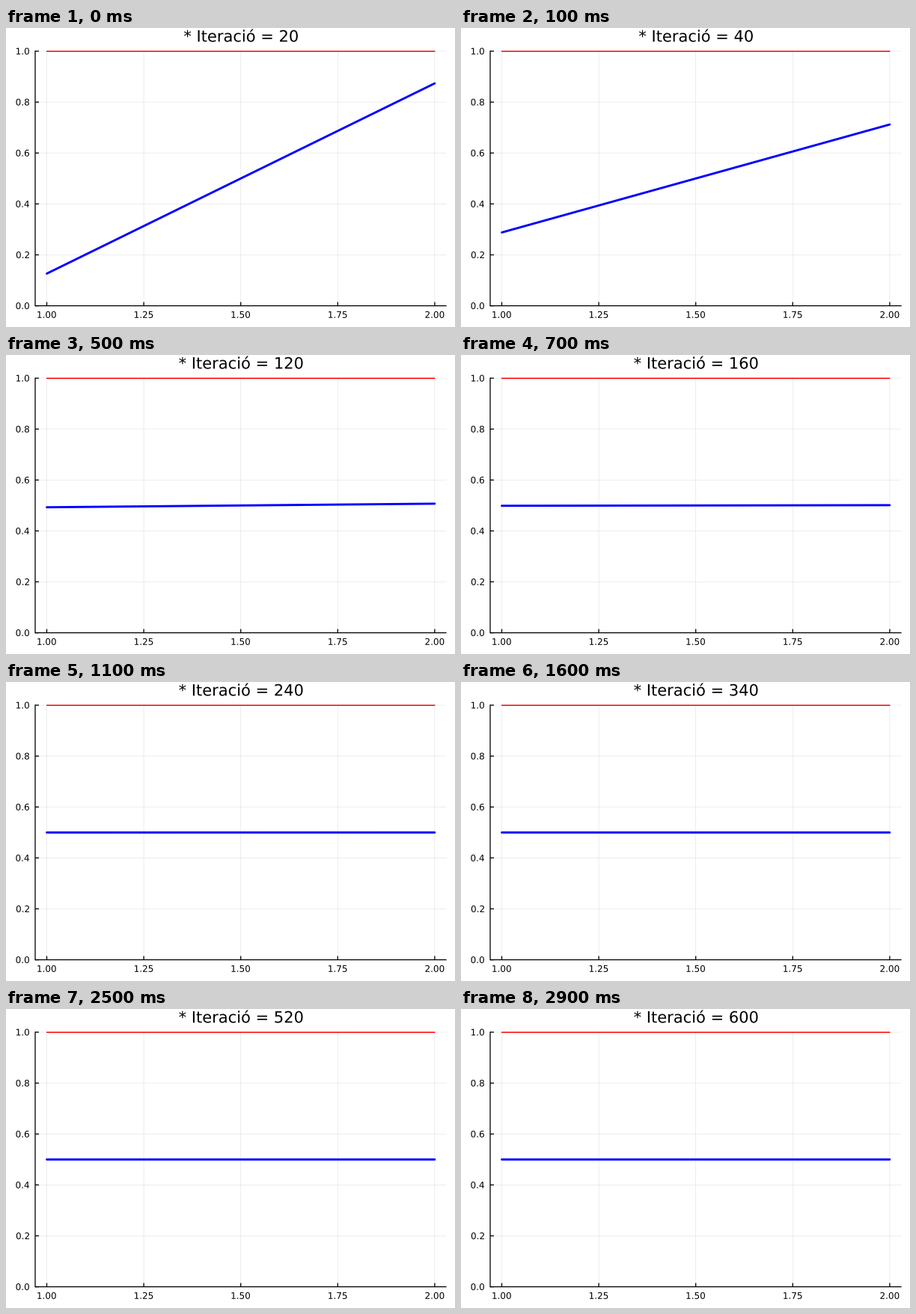
A matplotlib script for the animation above (3 s loop, 600 by 400 pixels).

```python
import numpy as np
import matplotlib.pyplot as plt
from matplotlib.animation import FuncAnimation
from matplotlib.patches import PathPatch
from matplotlib.textpath import TextPath
from matplotlib.transforms import Affine2D

W, H, DPI = 600, 400, 100
FRAMES, STEP = 30, 20
LEFT, RIGHT, TOP, BOTTOM = 39.0, 588.6, 31.0, 371.6
X1, X2 = 54.5, 572.9
TICK = 5
TITLE_SIZE, LABEL_SIZE = 21, 12

plt.rcParams["font.family"] = "DejaVu Sans"

fig = plt.figure(figsize=(W / DPI, H / DPI), dpi=DPI, facecolor="white")
ax = fig.add_axes([0, 0, 1, 1])
ax.set_xlim(0, W)
ax.set_ylim(H, 0)
ax.axis("off")


def px(width):
    """Convert a width in pixels to points."""
    return width * 72 / DPI


def x_pos(value):
    return X1 + (value - 1) * (X2 - X1)


def y_pos(value):
    return BOTTOM - value * (BOTTOM - TOP)


def draw_line(xs, ys, color, width, cap="butt", **style):
    line, = ax.plot(xs, ys, color=color, lw=px(width), snap=False,
                    solid_capstyle=cap, **style)
    return line


def text_path(text, x, baseline, size, align=0.5):
    """Text outline whose ink is aligned at x (0 left, 0.5 centre, 1 right)."""
    path = TextPath((0, 0), text, size=size)
    box = path.get_extents()
    shift = x - (box.x0 + align * box.width)
    return path.transformed(Affine2D().scale(1, -1).translate(shift, baseline))


def draw_text(*args, **kwargs):
    patch = PathPatch(text_path(*args, **kwargs), fc="black", lw=0, snap=False)
    return ax.add_patch(patch)


def title_path(iteration):
    return text_path(f"* Iteració = {iteration}", 313.9, 18.3, TITLE_SIZE)


def half_gap(iteration):
    """Distance of each end from 0.5: slow near the bounds, then exponential."""
    u = 2.7 * np.exp(-0.0438 * iteration)
    return 0.5 * u / np.sqrt(1 + u * u)


x_ticks = np.linspace(1, 2, 5)
y_ticks = np.linspace(0, 1, 6)

for v in x_ticks:
    x = x_pos(v)
    draw_line([x, x], [TOP, BOTTOM], "black", 0.7, alpha=0.1)
    draw_line([x, x], [BOTTOM, BOTTOM - TICK], "black", 1.3)
    draw_text(f"{v:.2f}", x, 387.8, LABEL_SIZE)

for v in y_ticks:
    y = y_pos(v)
    draw_line([LEFT, RIGHT], [y, y], "black", 0.7, alpha=0.1)
    draw_line([LEFT, LEFT + TICK], [y, y], "black", 1.3)
    draw_text(f"{v:.1f}", 30.9, y + 4.4, LABEL_SIZE, align=1)

draw_line([LEFT, LEFT], [TOP, BOTTOM], "black", 1.3, cap="projecting")
draw_line([LEFT, RIGHT], [BOTTOM, BOTTOM], "black", 1.3)

title = ax.add_patch(PathPatch(title_path(STEP), fc="black", lw=0, snap=False))
blue = draw_line([X1, X2], [0, 0], "blue", 2.9, cap="round", zorder=3)
draw_line([X1, X2], [31.2, 31.2], "red", 1.5, cap="round", zorder=4)


def update(frame):
    iteration = STEP * (frame + 1)
    gap = half_gap(iteration)
    title.set_path(title_path(iteration))
    blue.set_ydata([y_pos(0.5 - gap), y_pos(0.5 + gap)])
    return title, blue


anim = FuncAnimation(fig, update, frames=FRAMES, interval=100,
                     repeat=True, repeat_delay=0, blit=False)
plt.show()
```
